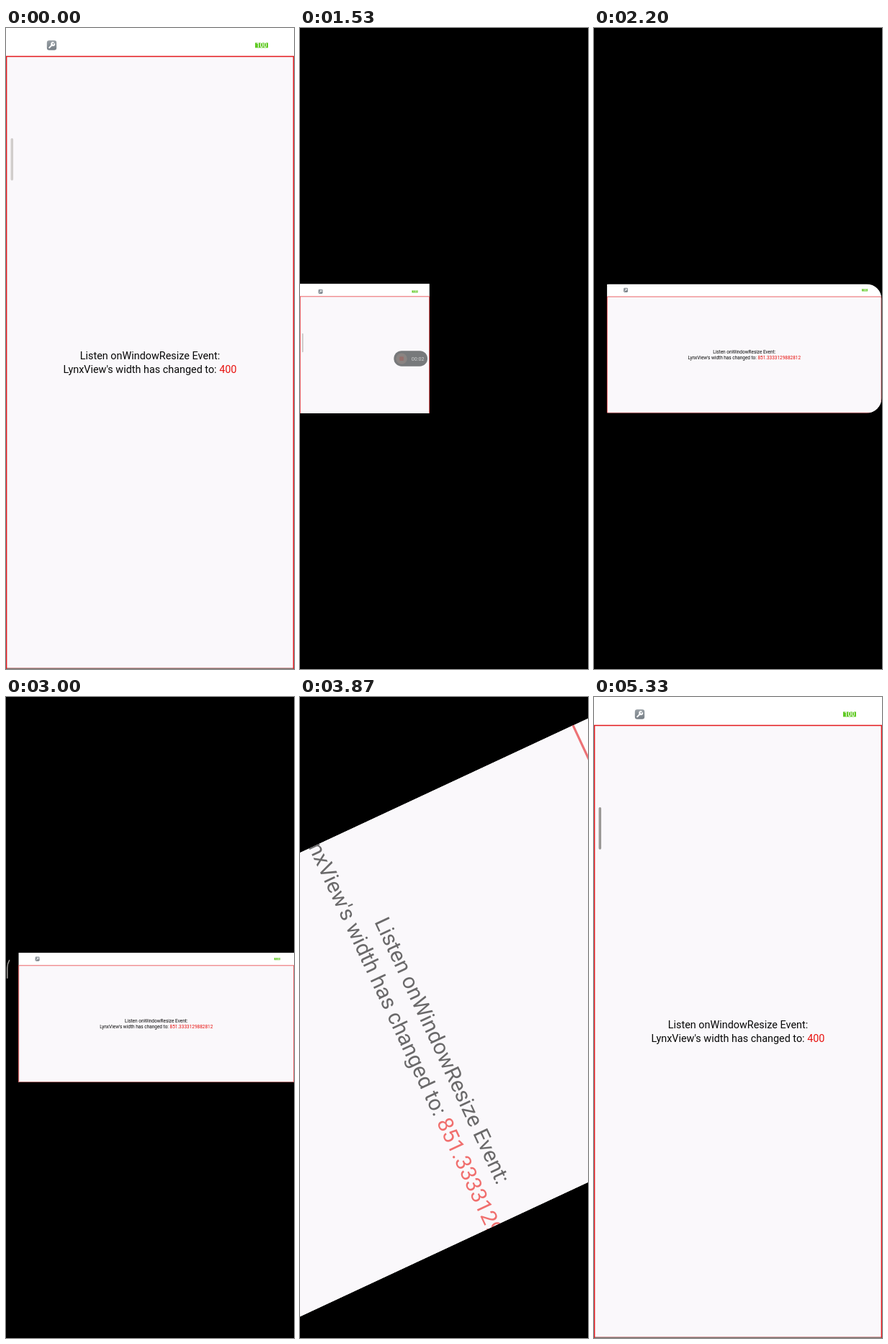
Animation of 400 by 890 pixels, one loop 5.8 s. Source, as an HTML page with a canvas:

```html
<!DOCTYPE html>
<html lang="en">
<head>
<meta charset="utf-8">
<title>Window resize</title>
<style>
  html, body { margin: 0; width: 100%; height: 100%; overflow: hidden; background: #000; }
  canvas { display: block; width: 400px; height: 890px; }
</style>
</head>
<body>
<canvas id="stage" width="400" height="890"></canvas>
<script>
const ctx = document.getElementById('stage').getContext('2d');
const SHORT = 400, LONG = 890, LOOP = 5800, TICK = 1000 / 15;
const TO_LANDSCAPE = 22 * TICK, TO_PORTRAIT = 56 * TICK;
const PAPER = '#faf8fb', RED = '#e3181c';

const PORTRAIT = { w: SHORT, h: LONG, inset: 0, value: '400', iconX: 63.5, batteryX: 355, barY: 24 };
const LANDSCAPE = { w: LONG, h: SHORT, inset: 39, value: '851.3333129882812', iconX: 97, batteryX: 838, barY: 19 };

const clamp = v => Math.max(0, Math.min(1, v));
const ramp = (t, from, to) => clamp((t - from) / (to - from));
const mix = (a, b, p) => a + (b - a) * p;
// Share of the way still to go for a critically damped spring.
const spring = (t, rate) => t <= 0 ? 1 : (1 + rate * t) * Math.exp(-rate * t);

function box(x, y, w, h, color) {
  ctx.fillStyle = color;
  ctx.fillRect(x, y, w, h);
}

function roundBox(x, y, w, h, r, color) {
  ctx.beginPath();
  ctx.roundRect(x, y, w, h, r);
  ctx.fillStyle = color;
  ctx.fill();
}

function line(points, color, width) {
  ctx.beginPath();
  points.forEach(([x, y], i) => i ? ctx.lineTo(x, y) : ctx.moveTo(x, y));
  ctx.strokeStyle = color;
  ctx.lineWidth = width;
  ctx.stroke();
}

function label(text, x, y, size, color, align = 'left', weight = 400) {
  ctx.font = `${weight} ${size}px Roboto, sans-serif`;
  ctx.textAlign = align;
  ctx.textBaseline = 'alphabetic';
  ctx.fillStyle = color;
  ctx.fillText(text, x, y);
  return ctx.measureText(text).width;
}

function drawWrench(x, y) {
  const shade = ctx.createLinearGradient(0, y - 7, 0, y + 7);
  shade.addColorStop(0, '#99a0a6');
  shade.addColorStop(1, '#757d84');
  roundBox(x - 6.7, y - 6.8, 13.4, 13.6, 3.2, shade);
  ctx.lineCap = 'round';
  line([[x - 3.4, y + 3.4], [x + 1, y - 1]], '#fff', 2);
  ctx.beginPath();
  ctx.arc(x + 1.7, y - 1.7, 2.1, -0.1, Math.PI * 1.6);
  ctx.lineWidth = 1.7;
  ctx.stroke();
  ctx.lineCap = 'butt';
}

function drawMessage(centre, middle, value) {
  const size = 14.4, lead = "LynxView's width has changed to: ";
  label('Listen onWindowResize Event:', centre, middle - 4.2, size, '#080808', 'center');
  const total = ctx.measureText(lead + value).width;
  const x = centre - total / 2;
  const width = label(lead, x, middle + 14.6, size, '#080808');
  label(value, x + width, middle + 14.6, size, '#e8120f');
}

function drawHandle(screen, alpha, color) {
  if (alpha <= 0) return;
  ctx.save();
  ctx.globalAlpha = alpha;
  ctx.lineCap = 'round';
  ctx.strokeStyle = color;
  ctx.lineWidth = 3.5;
  ctx.beginPath();
  if (screen === PORTRAIT) {
    ctx.moveTo(8.3, 154.8);
    ctx.lineTo(8.3, 210);
  } else {
    ctx.moveTo(4, 78);
    ctx.lineTo(4, 47);
    ctx.quadraticCurveTo(4, 34, 10.3, 23.5);
  }
  ctx.stroke();
  ctx.restore();
}

function drawRecorder() {
  roundBox(290, 207, 104, 48, 24, '#77797b');
  roundBox(297, 214.5, 34, 34, 17, '#8a8482');
  roundBox(307.5, 225, 13, 13, 3, '#95706d');
  label('00:02', 364, 237, 16, '#cfd0d1', 'center');
}

function drawScreen(screen, { handle = 0, handleColor = '#9b9996', recorder = false, settled = true } = {}) {
  const { w, h, inset } = screen;
  box(0, 0, w, h, '#000');
  box(inset, 0, w - inset, h, '#fff');
  box(inset, 39, w - inset, h - 39, PAPER);
  ctx.strokeStyle = RED;
  ctx.lineWidth = 1.5;
  ctx.strokeRect(inset + 0.6, 39.5, w - inset - 1.2, h - 40.1);
  if (settled) box(inset + 1, h - 1.2, w - inset - 2, 1.2, '#777670');
  drawWrench(screen.iconX, screen.barY);
  box(screen.batteryX - 9, screen.barY - 3.5, 18, 7, '#5fc922');
  label('100', screen.batteryX, screen.barY + 3, 8.4, '#fff', 'center', 500);
  drawMessage((inset + w) / 2, mix(39, h, 0.5), screen.value);
  drawHandle(screen, handle, handleColor);
  if (recorder) drawRecorder();
}

// A centred, scaled screen under a veil of the paper colour.
function drawVeiled(screen, scale, veil, options) {
  ctx.scale(scale, scale);
  ctx.translate(-screen.w / 2, -screen.h / 2);
  drawScreen(screen, options);
  if (veil <= 0) return;
  ctx.globalAlpha = veil;
  box(0, 0, screen.w, screen.h, PAPER);
}

// The old screen turns, grows and pales; the new one then appears in the same window.
function drawTurn(u, from, to, options) {
  if (u < 70) return drawScreen(from, options);
  if (u >= 790) return drawScreen(to, { handle: ramp(u, 1000, 1540) });

  const turn = (to === PORTRAIT ? 90 : -90) * spring(u - 81, 0.0198);
  const grown = mix(LONG, SHORT, (1 + (u - 63) / 22.4) ** -1.5);
  const shrunk = mix(grown * SHORT / LONG, LONG, spring(u - 63, 0.0284));
  const [w, h] = to === PORTRAIT ? [shrunk, grown] : [grown, shrunk];

  ctx.save();
  ctx.translate(to.w / 2, to.h / 2);
  ctx.rotate(turn * Math.PI / 180);
  ctx.beginPath();
  ctx.roundRect(-w / 2, -h / 2, w, h, 46);
  ctx.clip();
  if (u < 238) drawVeiled(from, grown / SHORT, ramp(u, 63, 238), options);
  else drawVeiled(to, grown / LONG, 1 - ramp(u, 200, 320), { settled: false });
  ctx.restore();
}

function render(t) {
  ctx.setTransform(1, 0, 0, 1, 0, 0);
  box(0, 0, SHORT, LONG, '#000');
  ctx.save();
  if (t < TO_LANDSCAPE) {
    drawScreen(PORTRAIT, { handle: 1, handleColor: '#d0cdcb' });
  } else if (t < TO_PORTRAIT) {
    const fit = SHORT / LONG;
    ctx.translate(0, (LONG - SHORT * fit) / 2);
    ctx.scale(fit, fit);
    ctx.beginPath();
    ctx.rect(0, 0, LONG, SHORT);
    ctx.clip();
    drawTurn(t - TO_LANDSCAPE, PORTRAIT, LANDSCAPE,
      { handle: 1, handleColor: '#c4c2c0', recorder: true });
  } else {
    drawTurn(t - TO_PORTRAIT, LANDSCAPE, PORTRAIT, { handle: 1 });
  }
  ctx.restore();
}

const start = performance.now();
function loop() {
  const t = (performance.now() - start) % LOOP;
  render(Math.floor((t + 5) / TICK) % 87 * TICK + 0.01);
  requestAnimationFrame(loop);
}
loop();
</script>
</body>
</html>
```
